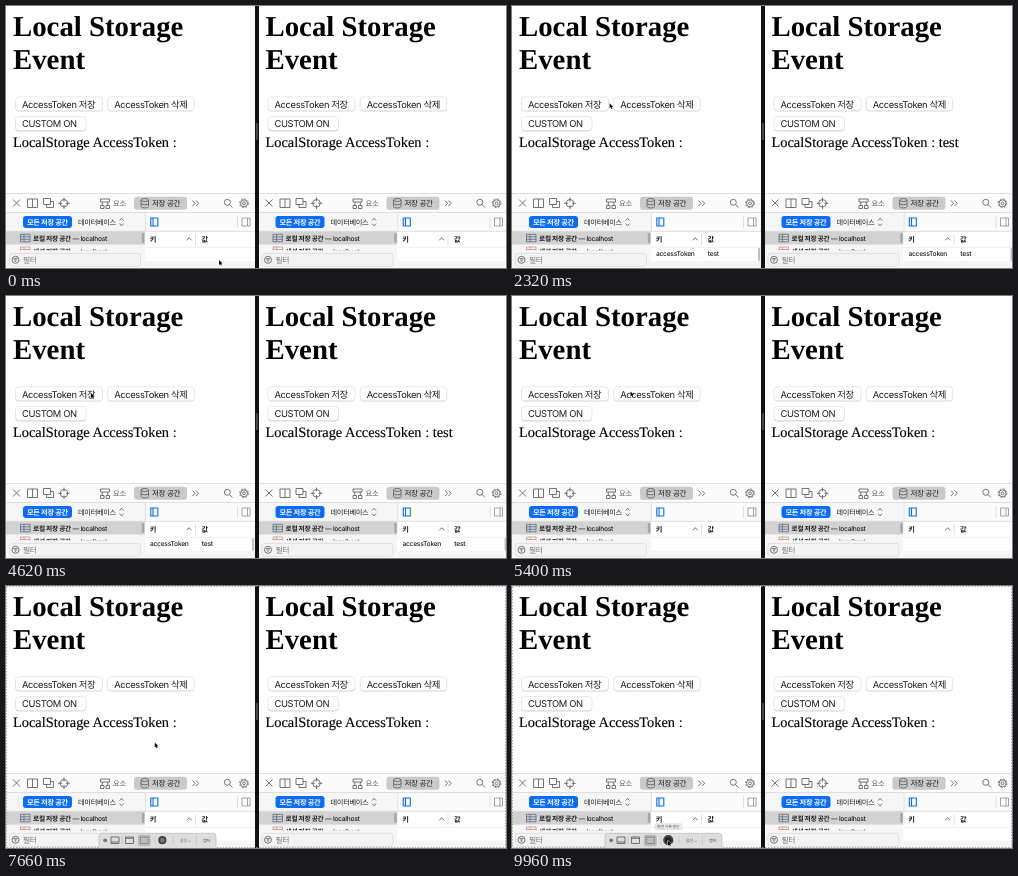
Write an HTML page that moves like this. It is 500 px wide and 262 px high and loops after 9980 ms.

```html
<!DOCTYPE html>
<html lang="ko">
<head>
<meta charset="utf-8">
<style>
  html, body { margin: 0; width: 100%; height: 100%; overflow: hidden; background: #fff; }
  svg { display: block; width: 100vw; height: 100vh; font-weight: 500; text-rendering: geometricPrecision; }
  text { font-family: Inter, "Noto Sans CJK KR", "Noto Sans CJK", sans-serif; fill: #1c1c1c; white-space: pre; letter-spacing: -.04em; }
  .serif { font-family: "Liberation Serif", serif; font-weight: 400; fill: #000; stroke: #000; stroke-width: .15; letter-spacing: 0; }
  .heading { font-weight: 700; stroke: none; }
  .line { fill: none; stroke: #666; stroke-width: .9; }
  .rule { fill: none; stroke: #d8d8d8; stroke-width: .8; }
</style>
</head>
<body>
<svg id="stage" viewBox="0 0 500 262"></svg>
<script>
const LOOP = 9980;
const stage = document.getElementById('stage');

const text = (x, y, size, content, attrs = '') =>
  `<text x="${x}" y="${y}" font-size="${size}" ${attrs}>${content}</text>`;
const box = (x, y, w, h, fill, r = 0, attrs = '') =>
  `<rect x="${x}" y="${y}" width="${w}" height="${h}" rx="${r}" fill="${fill}" ${attrs}/>`;
const path = (d, cls = 'line', attrs = '') => `<path class="${cls}" d="${d}" ${attrs}/>`;

const button = (name, x, y, w, label) =>
  box(x, y + .8, w, 14, '#000', 3.5, 'opacity=".16"') +
  box(x, y, w, 14, '#fff', 3.5, `class="${name}" stroke="#dadada" stroke-width=".6"`) +
  text(x + 6.5, y + 10.8, 9.4, label, 'font-weight="400"');

const page = () =>
  text(7, 29.8, 28.8, 'Local Storage', 'class="serif heading"') +
  text(7, 62.8, 28.8, 'Event', 'class="serif heading"') +
  button('save', 9.5, 90.8, 87, 'AccessToken 저장') +
  button('remove', 101.7, 90.8, 86.5, 'AccessToken 삭제') +
  button('custom', 9.5, 110.6, 70.5, 'CUSTOM ON') +
  text(7, 141, 14.4, 'LocalStorage AccessToken :<tspan class="value"> test</tspan>', 'class="serif"');

const toolbar = () =>
  box(0, 187, 250, 20, '#fbfbfb') + path('M0 187.5H250M0 206.5H250', 'rule') +
  path('M7 193.5l7 7m0-7l-7 7') +
  path('M21.5 193h10v8.5h-10zM26.5 193v8.5') +
  path('M37.5 192.5h7v6h-7zM40.5 198.5v3h7v-6h-3') +
  '<circle class="line" cx="58" cy="197.3" r="3.8"/>' +
  path('M58 191.5v4m0 3.6v4M52.2 197.3h4m3.6 0h4') +
  path('M94.5 193h9v3h-9zM94.5 199.5h3.5v3h-3.5zM100 199.5h3.5v3H100zM96.3 196v3.5M101.8 196v3.5') +
  text(107, 200, 7.3, '요소', 'style="fill:#555"') +
  box(128, 190.8, 53, 13, '#cacaca', 3) +
  '<ellipse class="line" cx="138.8" cy="194" rx="3.7" ry="1.5"/>' +
  path('M135.1 194v6.5q0 1.5 3.7 1.5t3.7-1.5V194M135.1 197.3q0 1.5 3.7 1.5t3.7-1.5') +
  text(146, 200, 7.5, '저장 공간') +
  path('M186.5 194.5l2.6 2.8-2.6 2.8M190 194.5l2.6 2.8-2.6 2.8') +
  '<circle class="line" cx="221.3" cy="196.3" r="3"/>' + path('M223.5 198.5l3 3') +
  '<circle class="line" cx="238" cy="197.3" r="3.5"/><circle class="line" cx="238" cy="197.3" r="1.4"/>' +
  '<circle class="line" cx="238" cy="197.3" r="4.4" stroke-dasharray="1.7 1.75"/>';

const tableIcon = (y, color) =>
  path(`M14.5 ${y}h9.5v7.5h-9.5zM14.5 ${y + 2.5}h9.5M14.5 ${y + 5}h9.5M18 ${y}v7.5`, 'line', `style="stroke:${color}"`);

const sidebar = () =>
  box(0, 207, 139, 55, '#f6f6f6') +
  box(17, 210, 49, 12, '#0a6cff', 3) +
  text(21, 218.7, 7.2, '모든 저장 공간', 'style="fill:#fff" font-weight="700"') +
  text(72, 218.7, 7.2, '데이터베이스') +
  path('M113.6 214.6l2-2.3 2 2.3M113.6 217.6l2 2.3 2-2.3') +
  box(0, 225.5, 139, 13, '#d2d2d2') + tableIcon(228.3, '#66758c') +
  text(27, 234.8, 6.7, '<tspan font-weight="700">로컬 저장 공간</tspan> — localhost') +
  '<g clip-path="url(#list)">' + tableIcon(241, '#d9968f') +
  text(27, 247.6, 6.7, '<tspan font-weight="700">세션 저장 공간</tspan> — localhost') + '</g>' +
  box(135.8, 227, 2.4, 10, '#a5a5a5', 1.2) +
  box(0, 244.5, 139, 18, '#f6f6f6') +
  box(3.5, 247.3, 131, 13, '#f3f3f3', 3, 'stroke="#dadada" stroke-width=".8"') +
  '<circle class="line" cx="9.5" cy="253.8" r="3.5"/>' +
  path('M7.5 252.7h4M8.2 254h2.6M8.9 255.3h1.2') +
  text(17, 256.6, 7.8, '필터', 'style="fill:#777"');

const table = () =>
  box(139, 207, 111, 18, '#fbfbfb') +
  path('M144.8 212h7v8h-7zM147 212v8', 'line', 'style="stroke:#0a6cff;stroke-width:1.1"') +
  path('M236 212h8v8h-8zM241.5 212v8', 'line', 'style="stroke:#999"') + path('M231.5 210v12', 'rule') +
  box(139, 225, 111, 30, '#fff') + box(139, 255, 111, 7, '#f5f5f5') +
  path('M0 225.3H250M189.5 228V239M139.5 207V225', 'rule') +
  path('M139 241.3H250', 'rule', 'opacity=".5"') +
  text(143.8, 236, 7.2, '키', 'font-weight="700"') + text(195.5, 236, 7.2, '값', 'font-weight="700"') +
  path('M180.8 234.3l2.4-2.6 2.4 2.6') +
  '<g class="value">' + text(144, 250.3, 6.7, 'accessToken') + text(195.8, 250.3, 6.7, 'test') +
  box(246, 242, 2.2, 13, '#c0c0c0', 1.1) + '</g>';

const pane = (id, x) =>
  `<g id="${id}" transform="translate(${x})" clip-path="url(#pane)">${page() + toolbar() + sidebar() + table()}</g>`;

const captureBar = () =>
  box(.5, .5, 499, 261, 'none', 0, 'stroke="#999" stroke-width=".8" stroke-dasharray="1.5 1.5"') +
  box(93, 247.3, 117, 18, '#dedede', 3, 'stroke="#bdbdbd" stroke-width=".7"') +
  '<circle cx="99.2" cy="254.3" r="1.9" fill="#777"/>' +
  path('M105 251h8v6.5h-8zM105 256h8') +
  path('M119.5 251h8v6.5h-8zM119.5 252.3h8') +
  box(131.8, 248.7, 13, 11.5, '#bcbcbc', 2) +
  path('M134.3 251h8v6.5h-8z', 'line', 'stroke-dasharray="1.3 .7"') +
  path('M116.2 250v8M149 250v8M167 250v8M190.5 250v8', 'rule', 'style="stroke:#c4c4c4"') +
  '<circle id="record" cx="156.3" cy="254.2" r="3.2" fill="#777" stroke="#444" stroke-width="1.8"/>' +
  text(174, 255.6, 4, '옵션 ⌄', 'style="fill:#666"') +
  text(197, 255.6, 4, '캡처', 'style="fill:#444"') +
  '<g id="tip">' + box(143, 237.8, 27, 5.8, '#ececec', 1, 'stroke="#c8c8c8" stroke-width=".5"') +
  text(145, 242.2, 3.9, '화면 기록 중단', 'style="fill:#555"') + '</g>';

stage.innerHTML =
  '<clipPath id="pane"><path d="M0 0H249.5V262H0z"/></clipPath>' +
  '<clipPath id="list"><path d="M0 238.5H139V244.5H0z"/></clipPath>' +
  pane('left', 0) + pane('right', 252.5) +
  box(249, 0, 4, 262, '#111') + box(250.3, 117, 1.3, 17, '#666', .6) +
  `<g id="capture">${captureBar()}</g>` +
  '<path id="cursor" d="M0 0V5L1.2 4L2 5.7L2.8 5.3L2.1 3.6H3.6z" fill="#000" stroke="#fff" stroke-width=".8" paint-order="stroke"/>';

// Pointer moves: start, end, destination x, y.
const moves = [
  [0, 0, 213, 254],
  [20, 240, 176, 242],
  [400, 940, 80, 97.5],
  [2120, 2640, 133, 97],
  [3280, 3880, 85, 97],
  [4620, 5080, 118.5, 95.5],
  [7300, 8160, 198, 256],
  [8380, 9060, 156, 254.5],
];
const presses = { save: [[1440, 1560], [4120, 4200]], remove: [[2740, 2860], [5280, 5380]] };
const stored = [[1560, 2860], [4200, 5380]];

const within = (ranges, t) => ranges.some(([from, to]) => t >= from && t < to);
const show = (element, visible) => element.setAttribute('visibility', visible ? 'visible' : 'hidden');
const $ = selector => stage.querySelector(selector);

function pointer(t) {
  let x = 0, y = 0;
  for (const [from, to, toX, toY] of moves) {
    if (t < from) break;
    const p = to > from ? Math.min(1, (t - from) / (to - from)) : 1;
    const eased = p * p * (3 - 2 * p);
    x += (toX - x) * eased;
    y += (toY - y) * eased;
  }
  return [x, y];
}

const values = stage.querySelectorAll('g.value');
const rightText = $('#right tspan.value');
show($('#left tspan.value'), false);

function draw(t) {
  const hasToken = within(stored, t);
  values.forEach(row => show(row, hasToken));
  show(rightText, hasToken);
  for (const name in presses)
    $(`#left .${name}`).setAttribute('fill', within(presses[name], t) ? '#ececec' : '#fff');

  $('#capture').style.display = t >= 7400 ? '' : 'none';
  $('#tip').style.display = t >= 9100 ? '' : 'none';
  const recordPressed = t >= 9700;
  $('#record').setAttribute('r', recordPressed ? 4.2 : 3.2);
  $('#record').setAttribute('fill', recordPressed ? '#222' : '#777');
  $('#cursor').setAttribute('transform', `translate(${pointer(t)})`);
}

function frame() {
  draw(performance.now() % LOOP);
  requestAnimationFrame(frame);
}
frame();
</script>
</body>
</html>
```
